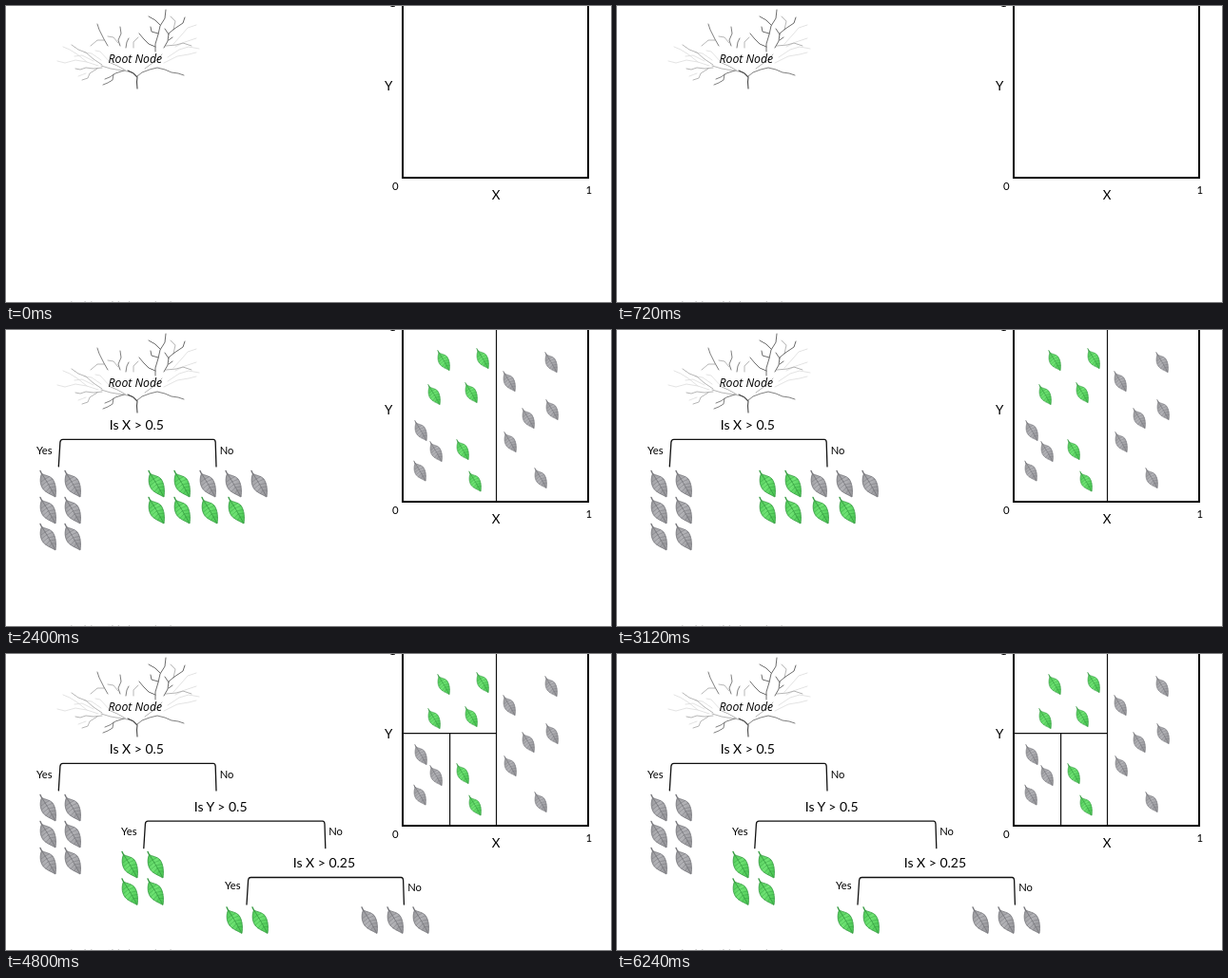
An HTML page that plays this animation: 636x312 px, repeating every 7200 ms.

```html
<!DOCTYPE html>
<html lang="en">
<head>
<meta charset="utf-8">
<title>Decision tree</title>
<style>
  html, body { margin: 0; width: 100%; height: 100%; overflow: hidden; background: #fff; }
  svg { display: block; width: 636px; height: 312px; }
  text { font-family: Lato, "Open Sans", sans-serif; fill: #000; }
  .root { font-family: "Open Sans", "Noto Sans", sans-serif; font-style: italic; }
  path { fill: none; stroke-linecap: round; stroke-linejoin: round; }
</style>
</head>
<body>
<svg id="stage" viewBox="0 0 636 312">
  <defs>
    <linearGradient id="green" x1="0" y1="0" x2="1" y2=".6">
      <stop offset="0" stop-color="#4cc655"/><stop offset=".5" stop-color="#70e474"/><stop offset="1" stop-color="#4fca58"/>
    </linearGradient>
    <linearGradient id="gray" x1="0" y1="0" x2="1" y2=".6">
      <stop offset="0" stop-color="#969699"/><stop offset=".5" stop-color="#b4b4b8"/><stop offset="1" stop-color="#9a9a9e"/>
    </linearGradient>
  </defs>
</svg>
<script>
const STEP = 1200, LOOP = 7200, LAST = 4;
const stage = document.getElementById('stage');
const layers = [];

function add(parent, tag, attrs, content) {
  const el = document.createElementNS('http://www.w3.org/2000/svg', tag);
  for (const key in attrs) el.setAttribute(key, attrs[key]);
  if (content) el.textContent = content;
  parent.appendChild(el);
  return el;
}

// A layer is visible from its first to its last step.
function layer(first, last = LAST) {
  const el = add(stage, 'g', {});
  layers.push({ el, first, last });
  return el;
}

const line = (g, d, width = 1.2, stroke = '#111') =>
  add(g, 'path', { d, stroke, 'stroke-width': width });

const label = (g, x, y, size, content, extra = {}) =>
  add(g, 'text', { x, y, 'font-size': size, ...extra }, content);

const BLADE = 'M-6.5-10.5C-8.5-6-8.5 0-5.5 5C-2.5 9.5 3 11 8 14C9 8 8.5 0 5-5C2-8.5-3-8.5-6.5-10.5Z';
const VEINS = 'M-3-5L-7-2M-1.5-2L-6.5 2M0 1L-5 5.5M2 4L-2 8.5M4 7L1.5 10.5M-3-5L1-7M-1.5-2L4.5-4.5M0 1L7-.5M2 4L8 3M4 7L8.3 7';

function leaf(g, color, x, y, scale = 1) {
  const [edge, vein] = color === 'green' ? ['#359a41', '#38a544'] : ['#747479', '#7a7a7f'];
  const el = add(g, 'g', { transform: `translate(${x} ${y}) scale(${scale})` });
  line(el, 'M-8-13.6L-6.3-10', 1.3, edge);
  add(el, 'path', { d: BLADE, style: `fill:url(#${color})`, stroke: edge, 'stroke-width': .8 });
  line(el, 'M-6-10Q0-1 7.5 13', .8, edge);
  line(el, VEINS, .55, vein);
}

function row(g, color, y, ...xs) {
  xs.forEach(x => leaf(g, color, x, y));
}

function split(g, left, right, top, question, qx, yes, no) {
  line(g, `M${left} ${top + 28.5}L${left + 1.6} ${top + 3}Q${left + 1.8} ${top} ${left + 4.5} ${top}` +
    `H${right - 3}Q${right - 1} ${top} ${right - .8} ${top + 3}L${right} ${top + 28.5}`, 1.3);
  label(g, qx, top - 10.4, 14, question);
  label(g, yes[0], yes[1], 11.2, 'Yes');
  label(g, no[0], no[1], 11.2, 'No');
}

// Root branches, from faint to dark
const base = layer(0);
line(base, 'M97 63L85 59 73 57 62 60 54 58M85 59L75 51 67 46 60 43M92 58L80 52 72 53M100 57L90 50 82 49' +
  'M166 60L180 53 192 51 200 49M170 54L182 46 192 43 203 45M176 40L185 30 191 23 200 20' +
  'M178 43L188 38 200 34M110 60L99 48 94 47M76 74L84 71', .8, '#dcdcdc');
line(base, 'M101 65L92 66 84 65 78 67 73 66M96 66L88 71 86 76 80 78M69 41L76 46 84 49 92 56 101 62' +
  'M118 39L113 33 107 32M103 36L96 36 89 42M134 44L134 38 139 33M168 42L179 41 186 39 195 42' +
  'M146 66L157 58 164 51M126 68L117 63 110 60M133 70L122 68 110 66 100 63M176 25L178 16 173 11', .8, '#a4a4a4');
line(base, 'M138 74L143 70 151 67 159 65 167 67 174 70 181 71 187 73' +
  'M124 68L115 71 109 75 104 77M113 72L112 78 107 81 102 83M107 42L103 35 100 29 98 25 96 19' +
  'M120 42L118 36 121 29 120 22M126 44L127 38 129 34', .9, '#727272');
line(base, 'M157 48L157 40 160 30 162 21 167 13 168 4M162 20L157 15 150 11M160 29L153 27 152 22' +
  'M157 43L150 40 145 35 140 29M166 44L170 37 171 29 177 24 186 18 188 12M171 30L167 24M171 36L175 33', .9, '#5c5c5c');
line(base, 'M138 87L137.5 80 138 75 134 71 128 68', 1.1, '#484848');
label(base, 107.5, 59.5, 12.3, 'Root Node', { class: 'root' });

// Plot frame
add(base, 'path', { d: 'M417-5V181H612V-5', stroke: '#000', 'stroke-width': 2, style: 'stroke-linejoin:miter' });
label(base, 398, 88.7, 13.4, 'Y');
label(base, 510.7, 204.2, 13.4, 'X');
label(base, 406, 193.7, 11.4, '0');
label(base, 609.5, 197.7, 11.4, '1');
label(base, 403, 1, 11.4, '1');
label(base, 25, 319.5, 11.4, 'Prepared with a tidy branch plot', { style: 'fill:#c4c4c4' });

// Scattered samples
const points = layer(1);
const GREEN = [[460, 32], [501, 30], [450, 68], [489, 66], [480, 126], [493, 159.5]];
const GRAY = [[573, 34], [529, 54], [574, 84], [549, 93], [530, 118], [436, 106], [452, 128], [435, 148.5], [562, 156]];
GREEN.forEach(([x, y]) => leaf(points, 'green', x, y, .76));
GRAY.forEach(([x, y]) => leaf(points, 'gray', x, y, .76));

// All samples at the root
const all = layer(1, 1);
row(all, 'gray', 107, 42, 69, 96, 178, 205, 232);
row(all, 'green', 107, 124, 151);
row(all, 'gray', 135, 42, 69, 96);
row(all, 'green', 135, 124, 151, 179, 207);

// First split
const first = layer(2);
split(first, 55.3, 221, 115.4, 'Is X > 0.5', 108.7, [32, 131], [224.7, 131]);
for (const y of [162, 190, 218]) row(first, 'gray', y, 44, 70);
line(first, 'M515.5 0V181');
const firstRest = layer(2, 2);
row(firstRest, 'green', 162, 158, 185);
row(firstRest, 'gray', 162, 212, 239, 266);
row(firstRest, 'green', 190, 158, 185, 214, 242);

// Second split
const second = layer(3);
split(second, 144.8, 335.8, 176.2, 'Is Y > 0.5', 197.7, [121, 191], [339.2, 191]);
for (const y of [222, 250.5]) row(second, 'green', y, 130, 157);
line(second, 'M417 83.6H515.5');
const secondRest = layer(3, 3);
row(secondRest, 'gray', 222, 300.5, 327, 354);
row(secondRest, 'green', 250.5, 302, 329);

// Third split
const third = layer(4);
split(third, 253, 418.4, 235.5, 'Is X > 0.25', 301.7, [230, 247.5], [422.2, 250]);
row(third, 'green', 280.5, 240, 267);
row(third, 'gray', 280.5, 382, 409, 436);
line(third, 'M466.6 84V181');

function draw() {
  const step = Math.min(LAST, Math.floor(performance.now() % LOOP / STEP));
  for (const { el, first, last } of layers) {
    el.style.display = step >= first && step <= last ? '' : 'none';
  }
  requestAnimationFrame(draw);
}
draw();
</script>
</body>
</html>
```
